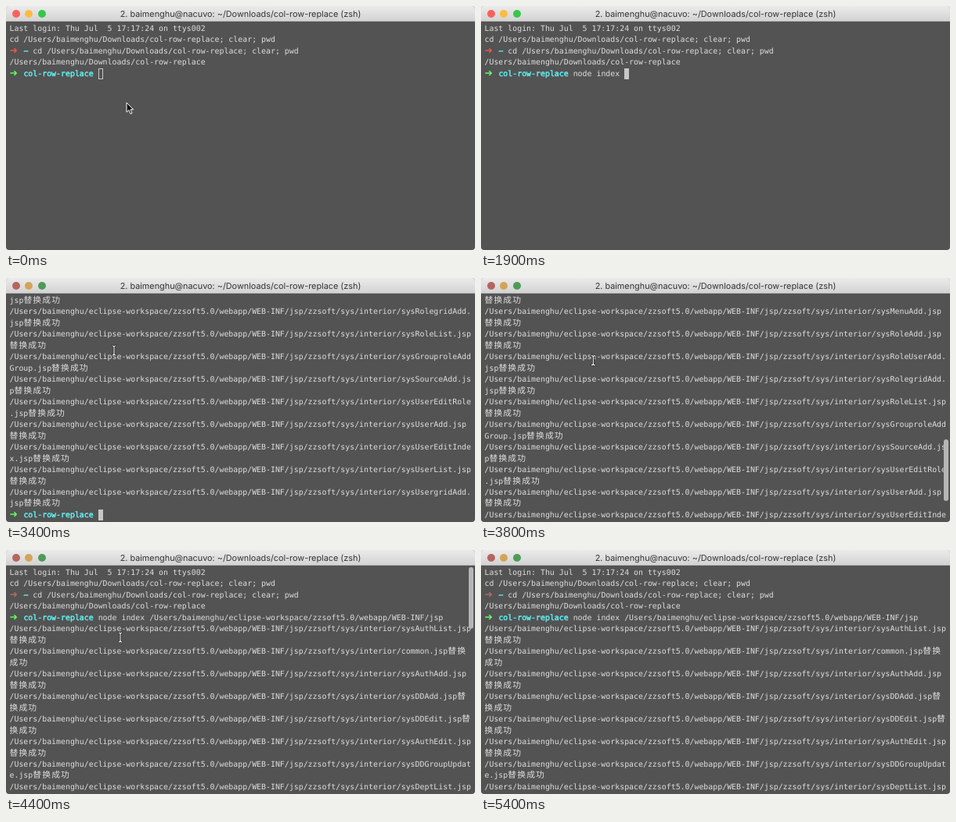
An HTML page for the animation above (5500 ms loop, 599 by 313 pixels).

```html
<!DOCTYPE html>
<html lang="en">
<head>
<meta charset="utf-8">
<title>Terminal</title>
<style>
  html, body { margin: 0; width: 100%; height: 100%; overflow: hidden; background: #fff; }
  #win {
    position: relative; width: 599px; height: 313px; overflow: hidden;
    border-radius: 4px; background: #535353; text-rendering: geometricPrecision;
  }
  #bar {
    position: absolute; inset: 0 0 auto; height: 20px; box-sizing: border-box;
    background: linear-gradient(#ebebeb, #d3d3d3); border-bottom: 1px solid #b4b4b4;
  }
  #bar i { position: absolute; top: 4.5px; width: 10px; height: 10px; border-radius: 50%; }
  #title {
    position: absolute; inset: 0; text-align: center; white-space: pre; color: #333;
    font: 10.85px/20px Inter, Roboto, sans-serif;
  }
  .red { left: 7.5px; background: #fc605b; }
  .yellow { left: 24px; background: #fdbc40; }
  .green { left: 40.6px; background: #34c84a; }
  .muted .red { background: #b5655f; }
  .muted .yellow { background: #d3a457; }
  .muted .green { background: #509a57; }
  #rows {
    position: absolute; left: 4.5px; top: 23px; color: #dedede; white-space: pre;
    font: 9.905px/14.47px "DejaVu Sans Mono", monospace;
  }
  #rows div { height: 14.47px; }
  .han { font: 10.8px/0 "Noto Sans CJK SC", "Noto Sans CJK", sans-serif; letter-spacing: 1.126px; }
  .arrow { display: inline-block; width: 5.963px; font: bold 12.5px/0 "DejaVu Sans", sans-serif; color: #5ff967; }
  .fail { color: #e8564f; }
  .dim .fail { color: #ad6a68; }
  b { color: #62f3f5; font-weight: normal; -webkit-text-stroke: 0.45px; }
  .caret {
    display: inline-block; position: relative; top: -1px; width: 1ch; height: 14px;
    vertical-align: top; background: #c7c7c7;
  }
  .hollow { box-sizing: border-box; background: none; border: 1px solid #c7c7c7; }
  #thumb {
    position: absolute; left: 591px; width: 6px; height: 79px;
    border-radius: 3px; background: #b6b6b6;
  }
  svg { position: absolute; left: 0; top: 0; overflow: visible; }
</style>
</head>
<body>
<div id="win">
  <div id="bar">
    <div id="title"></div>
    <i class="red"></i><i class="yellow"></i><i class="green"></i>
  </div>
  <div id="rows"></div>
  <div id="thumb"></div>
  <svg width="1" height="1">
    <defs><path id="ibeam" d="M-2 -6Q0 -6 0 -4V4Q0 6 -2 6M2 -6Q0 -6 0 -4V4Q0 6 2 6"/></defs>
    <path id="arrow" d="M0 0V12.2L2.9 9.5L5 14.3L7 13.4L5 8.8H8.8Z" fill="#111" stroke="#fff"/>
    <g id="beam" fill="none" stroke-linecap="round">
      <use href="#ibeam" stroke="#222" stroke-width="2.6"/>
      <use href="#ibeam" stroke="#f4f4f4" stroke-width="1.1"/>
    </g>
  </svg>
</div>
<script>
const LOOP = 5500, TICK = 100, COLS = 99, VISIBLE = 20;
const $ = id => document.getElementById(id);

const home = '/Users/baimenghu';
const project = home + '/Downloads/col-row-replace';
const target = home + '/eclipse-workspace/zzsoft5.0/webapp/WEB-INF/jsp';
const idleTitle = '2. baimenghu@nacuvo: ~/Downloads/col-row-replace (zsh)';
const busyTitle = `2. node index ${target} (zsh)`;
const command = 'node index ';

const go = `cd ${project}; clear; pwd`;
const prompt = '<span class="arrow">➜</span>  <b>col-row-replace</b> ';
const caret = '<span class="caret"></span>';
const hollow = '<span class="caret hollow"></span>';
const header = [
  'Last login: Thu Jul  5 17:17:24 on ttys002',
  go,
  `<span class="arrow fail">➜</span>  <b>~</b> ${go}`,
  project
];

const files = `AuthList common AuthAdd DDAdd DDEdit AuthEdit DDGroupUpdate DeptList DeptAdd
  DDGroupList DDList GridEdit GridAdd DDGroupAdd GroupAdd GridList RoleAuthEdit GroupList
  GroupEdit GroupUserAdd MenuList MenuAdd RoleAdd RoleUserAdd RolegridAdd RoleList
  GrouproleAddGroup SourceAdd UserEditRole UserAdd UserEditIndex UserList UsergridAdd`
  .split(/\s+/).map(n => n === 'common' ? n : 'sys' + n);

// Wrap at the terminal width; Chinese characters take two cells.
function wrap(text) {
  const lines = [''];
  let used = 0;
  for (const ch of text) {
    const w = ch > '\u2e80' ? 2 : 1;
    if (used + w > COLS) { lines.push(''); used = 0; }
    lines[lines.length - 1] += ch;
    used += w;
  }
  return lines.map(s => s.replace(/[\u2e80-\uffff]+/g, '<span class="han">$&</span>'));
}

const output = files.flatMap(n => wrap(`${target}/zzsoft/sys/interior/${n}.jsp替换成功`));
const log = [...header, prompt + command + target, ...output, prompt + caret];
const last = log.length - VISIBLE;

// [time, first visible row]
const scroll = [[3700, 50], [3800, 46], [3900, 40], [4000, 34], [4100, 27], [4200, 20], [4300, 8], [4400, 0]];
// [time, x, y]
const pointer = [[0, 154, 124], [3100, 134, 86], [3400, 138, 93], [4000, 146, 112], [LOOP, 146, 112]];

function screen(t) {
  if (t < 2600) {
    const n = Math.max(0, Math.min(command.length, (t - 600) / TICK));
    const typed = command.slice(0, n) + (t >= 2200 ? target : '');
    return [...header, prompt + typed + (t < 300 ? hollow : caret)];
  }
  if (t < 3000) return [...log.slice(0, 5), caret];
  if (t < 3100) return [...log.slice(26, 45), caret];
  const top = topRow(t);
  return log.slice(top, top + VISIBLE);
}

function topRow(t) {
  return scroll.reduce((row, [at, r]) => t >= at ? r : row, last);
}

function pointerAt(t) {
  if (t < 3100) return pointer[0].slice(1);
  const i = pointer.findIndex(p => p[0] > t);
  const [t0, x0, y0] = pointer[i - 1], [t1, x1, y1] = pointer[i];
  const k = (t - t0) / (t1 - t0);
  return [x0 + (x1 - x0) * k, y0 + (y1 - y0) * k];
}

function show(el, on) { el.style.display = on ? '' : 'none'; }

function draw(t) {
  $('title').textContent = t >= 2600 && t < 3100 ? busyTitle : idleTitle;
  $('bar').className = t >= 3100 ? 'muted' : '';
  $('rows').innerHTML = screen(t).map(r => `<div>${r}</div>`).join('');
  $('rows').className = t >= 4300 ? 'dim' : '';

  show($('thumb'), t >= 3700 && t < 5000);
  $('thumb').style.top = 21.5 + topRow(t) / log.length * 290 + 'px';

  const move = `translate(${pointerAt(t)})`;
  $('arrow').setAttribute('transform', move);
  $('beam').setAttribute('transform', move);
  show($('arrow'), t < 400);
  show($('beam'), (t >= 400 && t < 700) || (t >= 3100 && t < 5000));
}

const start = performance.now();
let shown = -1;
function frame() {
  const t = Math.floor((performance.now() - start) % LOOP / TICK) * TICK;
  if (t !== shown) draw(shown = t);
  requestAnimationFrame(frame);
}
frame();
</script>
</body>
</html>
```
